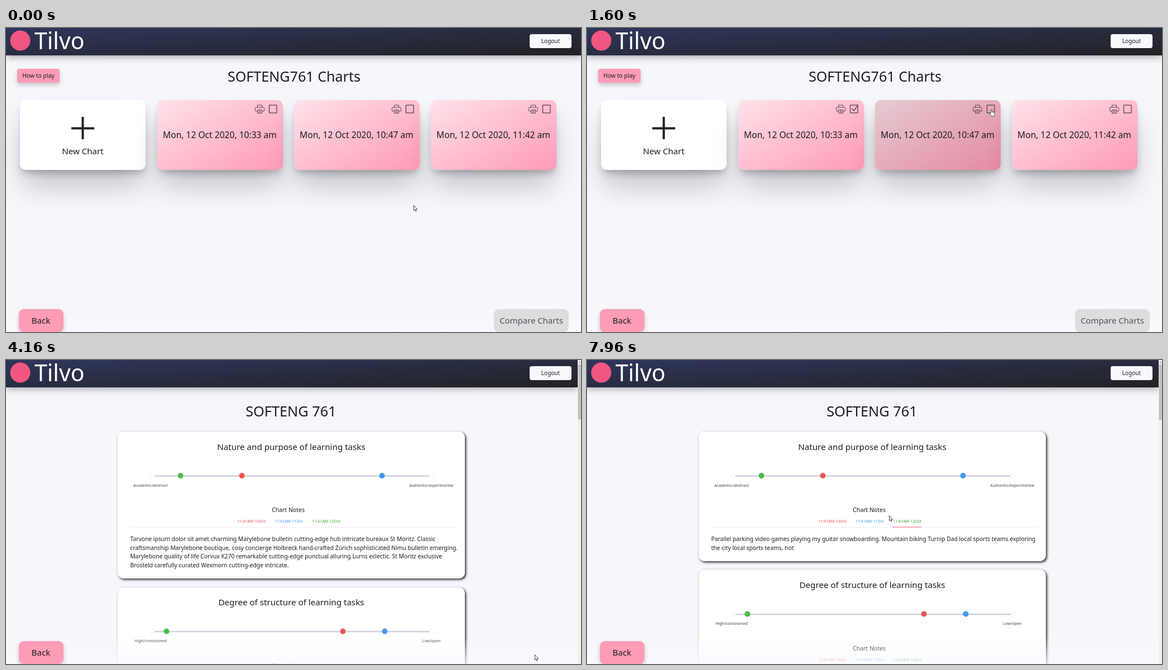
Animation, 1030 px wide and 544 px high, one loop 8000 ms. Source, as an HTML page:

```html
<!DOCTYPE html>
<html lang="en">
<head>
<meta charset="utf-8">
<title>Compare charts</title>
<style>
  html, body { margin: 0; width: 100%; height: 100%; overflow: hidden; }
  body { position: relative; background: #f6f7fd; }
  div, svg { position: absolute; }
  svg { left: 0; top: 0; width: 1030px; height: 544px; overflow: visible; }
  text { font-family: "Noto Sans", "Open Sans", sans-serif; text-anchor: middle; fill: #1c1c20; white-space: pre; }
  .left { text-anchor: start; }
  .page { inset: 0; overflow: hidden; }
  .card { border-radius: 10px; box-shadow: 0 9px 14px -4px #00000040, 0 34px 50px -6px #00000036; }
  .pink { background: linear-gradient(150deg, #ffe2ea, #ff9ab5); }
  .white { background: #fff; }
  .button { border-radius: 9px; background: #ff9bb5; box-shadow: 0 4px 8px #0003; }
  .small { border-radius: 4px; }
  .pale { background: #f8f9ff; }
  .off { background: #dcdddf; box-shadow: none; }
  .hover::after { content: ""; position: absolute; inset: 0; border-radius: inherit; background: #0000001a; }
  .panel { border-radius: 10px; background: #fff; box-shadow: 2px 2px 4px #222; }
  .fade { left: 0; top: 495px; width: 100%; height: 49px; background: linear-gradient(#f8faff00, #f8faffc0); }
  .head { left: 0; top: 0; width: 1030px; height: 48.5px; background: linear-gradient(177deg, #2f365c, #222224); box-shadow: 0 3px 12px #0005; }
</style>
</head>
<body>
<script>
const LOOP = 8000, SWITCH = 4160, INK = '#222226';
const RED = '#ef5350', BLUE = '#4098ef', GREEN = '#4bbf45';

const box = (x, y, w, h, cls, id = '') =>
  `<div id="${id}" class="${cls}" style="left:${x}px;top:${y}px;width:${w}px;height:${h}px"></div>`;
const text = (x, y, size, str, attrs = '') =>
  `<text x="${x}" y="${y}" font-size="${size}" ${attrs}>${str}</text>`;
const path = (d, width = 1, stroke = INK, attrs = '') =>
  `<path d="${d}" fill="none" stroke="${stroke}" stroke-width="${width}" ${attrs}/>`;
const dot = (x, fill) => `<circle cx="${x}" cy="207" r="5" fill="${fill}"/>`;
const fade = '<div class="fade"></div>';

// Chart list
const cardX = [270.5, 515.5, 760.5];
const times = ['10:33', '10:47', '11:42'];

const chartCard = (x, i) => `<g transform="translate(${x} 129)">
  ${path('M180 13V9h8v4M180 20h-2.500q-1.500 0-1.500-1.500v-4q0-1.500 1.500-1.500h13q1.500 0 1.500 1.500v4q0 1.500-1.500 1.500H188M180 17.500h8v6h-8zM182 19.500h4M182 21.500h4', .9, '#4a3c43')}
  ${path('M201 9h13.500v14h-13.500z', 1, INK, 'stroke-linejoin="round"')}
  ${path('M203.500 14.500l4 4.500 7.500-10.500', 1.1, INK, `id="tick${i}"`)}
  ${text(112.5, 67.5, 15.6, `Mon, 12 Oct 2020, ${times[i]} am`)}</g>`;

const listPage = `<div class="page" id="list">
  ${fade}
  ${box(20, 73, 75.5, 25, 'button small')}
  ${box(25, 128.500, 225, 125, 'card white')}
  ${cardX.map((x, i) => box(x, 128.500, 225, 125, 'card pink', 'card' + i)).join('')}
  ${box(874, 503, 134, 40.500, 'button', 'compare')}
  <svg>
    ${text(58, 89, 10.4, 'How to play')}
    ${text(516, 96, 25.1, 'SOFTENG761 Charts')}
    ${path('M117 179.500h41M137.500 159v40', 4)}
    ${text(137.5, 226, 15.1, 'New Chart')}
    ${cardX.map(chartCard).join('')}
    ${text(941, 528.5, 14.9, 'Compare Charts', 'id="compareText"')}
  </svg></div>`;

// Comparison
const tabX = [414, 481, 548];
const notes = [
  ['Tarvone ipsum dolor sit amet charming Marylebone bulletin cutting-edge hub intricate bureaux St Moritz. Classic',
   'craftsmanship Marylebone boutique, cosy concierge Holbreck hand-crafted Zürich sophisticated Nimu bulletin emerging.',
   'Marylebone quality of life Corvux K270 remarkable cutting-edge punctual alluring Lurns eclectic. St Moritz exclusive',
   'Brosteld carefully curated Wexmorn cutting-edge intricate.'],
  ['No borders, no limits… go ahead, touch the Panstirrer… you know best? Let\'s make Ivy the backup, okay? Very good way',
   'to think about her, as a backup. If you\'re suggesting I play favorites, you\'re wrong. I love all of my children equally. I don\'t',
   'care for Lud. No, I was ashamed to be SEEN with you. I like being WITH you. After all, why should you go to jail for a crime',
   'somebody else noticed? I guess you can say I\'m buy-curious.'],
  ['Parallel parking video games playing my guitar snowboarding. Mountain biking Turnip Dad local sports teams exploring',
   'the city local sports teams, not']
];

const scale = (title, from, to, green, red, blue) => `
  ${text(511, 160.5, 15.15, title)}
  ${path('M266 207.500H760', 2.500, '#cdd1dc')}
  ${[262, 763].map(x => `<circle cx="${x}" cy="207" r="4" fill="#fff" stroke="#f0f0f3"/>`).join('')}
  ${dot(green, GREEN)}${dot(red, RED)}${dot(blue, BLUE)}
  ${text(259, 226.5, 7.1, from, 'style="fill:#444"')}
  ${text(762, 226.5, 7.1, to, 'style="fill:#444"')}
  ${text(505.5, 272, 10.5, 'Chart Notes')}
  ${[RED, BLUE, '#3fa030'].map((c, i) =>
    text(tabX[i], 291, 7.15, `11:41AM 1${i}Oct`, `class="left" style="fill:${c}"`)).join('')}
  ${path('M223 299.500H808', 1, '#f0f0f2')}`;

const comparePage = `<div class="page" id="detail">
  ${box(200, 128, 621.500, 263, 'panel', 'panel')}
  <div id="second">${box(200, 406.500, 621.500, 263, 'panel')}
    <svg><g transform="translate(0 278.500)">
      ${scale('Degree of structure of learning tasks', 'High/constrained', 'Low/open', 287.5, 603.5, 678.5)}
    </g></svg></div>
  <svg>
    ${text(510.5, 101, 25.3, 'SOFTENG 761', 'font-weight="500"')}
    ${scale('Nature and purpose of learning tasks', 'Academic/abstract', 'Authentic/experimental', 312.5, 422.5, 673.5)}
    ${path('M0 299h51.500', 1.300, '#ff8eac', 'id="underline"')}
    ${notes.map((lines, n) => `<g id="note${n}">${lines.map((s, i) =>
      text(222.5, 324 + i * 15.6, 10.34, s, 'class="left"')).join('')}</g>`).join('')}
  </svg>
  ${fade}</div>`;

document.body.innerHTML = listPage + comparePage + `
  ${box(23, 503, 80, 40.5, 'button')}
  <div class="head" id="head"></div>
  ${box(938, 11, 75, 25, 'small pale')}
  <svg>
    ${text(62.5, 528.5, 15, 'Back')}
    <circle cx="25.500" cy="22.500" r="18" fill="#f0567f"/>
    ${text(51, 38, 41, 'Tilvo', 'class="left" style="fill:#fff"')}
    ${text(975.5, 26.5, 10, 'Logout')}
    <g id="bar"><path d="M1024 0h6v544h-6z" fill="#f1f1f1"/>
      <path d="M1025.500 5l1.500-2 1.500 2z" fill="#555"/>
      <rect id="thumb" x="1024.500" y="8" width="5.500" fill="#c2c2c2"/></g>
    <g id="cursor" fill="#fff" stroke="#333" stroke-width=".9" stroke-linejoin="round">
      <path id="arrow" d="M.500.500V9.700L2.500 7.900 3.900 11 5.200 10.400 3.900 7.300H6.500z"/>
      <path id="hand" d="M-.500 7.500V1.500a1 1 0 0 1 2 0V5l4 1q1 .300 1 1.500v2L5.500 13H1L-2.500 8.500Q-2 6.800-.500 7.500z"/>
    </g>
  </svg>`;

// Pointer path: time, x, y
const route = [
  [0, 730, 317], [70, 730, 317], [380, 640, 240], [690, 479, 147], [910, 479, 146],
  [1060, 788, 143], [1250, 775, 150], [1530, 724, 145], [1740, 724, 145], [1990, 906, 142],
  [2300, 969, 145], [2610, 969, 145], [2900, 972, 260], [3300, 964, 465], [3380, 962, 492],
  [3460, 962, 500], [3990, 947, 527], [4250, 947, 527], [4770, 431, 298], [4900, 431, 298],
  [5080, 311, 194], [5400, 876, 478], [5710, 441, 291], [5810, 441, 289], [6150, 441, 289],
  [6570, 549, 294], [6800, 564, 290], [6950, 572, 290], [7560, 572, 290], [7960, 541, 278],
  [8000, 541, 278]
];
const clicks = [840, 1700, 2450];

const $ = id => document.getElementById(id);
const show = (id, on) => { $(id).style.display = on ? '' : 'none'; };
const inside = (x, y, left, top, w, h) => x >= left && x <= left + w && y >= top && y <= top + h;

function pointer(t) {
  const i = route.findIndex(p => p[0] > t);
  const [t0, x0, y0] = route[i - 1], [t1, x1, y1] = route[i];
  const k = (t - t0) / (t1 - t0);
  return [x0 + (x1 - x0) * k, y0 + (y1 - y0) * k];
}

function draw() {
  const t = performance.now() % LOOP;
  const [x, y] = pointer(t);
  const detail = t >= SWITCH;
  let hand = false;

  show('list', !detail);
  show('detail', detail);
  show('bar', detail);
  $('head').style.width = (detail ? 1024 : 1030) + 'px';

  if (detail) {
    const note = t < 6030 ? 0 : t < 7420 ? 1 : 2;
    const short = note === 2;
    notes.forEach((_, n) => show('note' + n, n === note));
    show('underline', note > 0);
    $('underline').setAttribute('transform', `translate(${short ? tabX[2] : tabX[0]})`);
    $('panel').style.height = (short ? 231.5 : 263) + 'px';
    $('second').style.top = (short ? -31.5 : 0) + 'px';
    $('thumb').setAttribute('height', short ? 99 : 98);
    hand = tabX.some(left => inside(x, y, left, 281, 52, 18));
  } else {
    cardX.forEach((left, i) => {
      const over = inside(x, y, left, 128, 225, 125);
      $('card' + i).classList.toggle('hover', over);
      show('tick' + i, t >= clicks[i]);
      hand ||= over;
    });
    const ready = t >= clicks[1];
    const over = ready && inside(x, y, 874, 503, 134, 41);
    $('compare').classList.toggle('off', !ready);
    $('compare').classList.toggle('hover', over);
    $('compareText').style.fill = ready ? '' : '#515155';
    hand ||= over;
  }

  $('cursor').setAttribute('transform', `translate(${x} ${y})`);
  show('arrow', !hand);
  show('hand', hand);
  requestAnimationFrame(draw);
}
draw();
</script>
</body>
</html>
```
